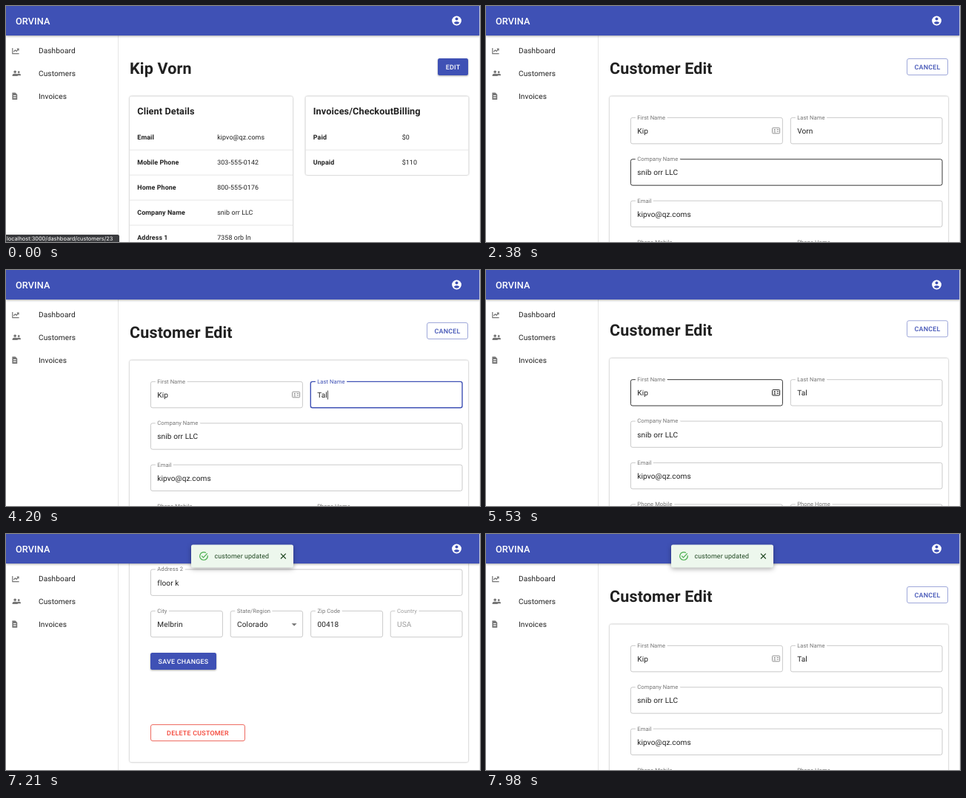
An HTML page for the animation above (8 s loop, 640 by 320 pixels).

```html
<!DOCTYPE html>
<html lang="en">
<head>
<meta charset="utf-8">
<title>Customer editor</title>
<style>
html, body { margin: 0; width: 100%; height: 100%; overflow: hidden; background: #fff; }
svg { display: block; width: 640px; height: 320px; }
text { font-family: Roboto, sans-serif; font-size: 10.1px; letter-spacing: .00938em; fill: #212121; white-space: pre; text-rendering: geometricPrecision; }
.title { font-size: 21.5px; font-weight: 700; letter-spacing: .00735em; }
.head { font-size: 12.7px; font-weight: 500; letter-spacing: .0075em; }
.bold { font-weight: 700; }
.cell { font-size: 8.9px; letter-spacing: .01071em; }
.btn { font-size: 8.9px; font-weight: 500; letter-spacing: .02857em; text-anchor: middle; }
.label { font-size: 7.6px; fill: #757575; stroke: #fff; stroke-width: 6px; paint-order: stroke; }
.off { fill: #9e9e9e; }
.status { font-family: Inter, sans-serif; font-size: 7.4px; letter-spacing: 0; }
.white { fill: #fff; }
.blue { fill: #3f51b5; }
.red { fill: #f44336; }
.green { fill: #1e4620; }
.box { fill: none; stroke: #c4c4c4; stroke-width: .9; }
.hover .box { stroke: #212121; }
.focus .box { stroke: #3f51b5; stroke-width: 1.4; }
.focus .label { fill: #3f51b5; }
.card { fill: #fff; filter: drop-shadow(0 .6px 1.1px rgba(0,0,0,.38)); }
.raised { fill: #3f51b5; filter: drop-shadow(0 1px 1.2px rgba(0,0,0,.35)); }
.raised.over { fill: #303f9f; }
.line { stroke: #e0e0e0; stroke-width: .8; }
.icon { fill: #757575; }
.stroke { fill: none; stroke-width: 1.2; }
#bar { filter: drop-shadow(0 1.6px 1.8px rgba(0,0,0,.35)); }
#toast { transform-origin: 319px 30px; }
#toast rect { fill: #edf7ed; filter: drop-shadow(0 2px 3px rgba(0,0,0,.32)); }
</style>
</head>
<body>
<svg id="stage" viewBox="0 0 640 320"></svg>
<script>
const text = (x, y, s, cls = '', id = '') => `<text x="${x}" y="${y}" class="${cls}" id="${id}">${s}</text>`;
const rect = (x, y, w, h, attrs = '') => `<rect x="${x}" y="${y}" width="${w}" height="${h}" ${attrs}/>`;
const line = (x, y, w) => `<path class="line" d="M${x} ${y}h${w}"/>`;
const group = (id, body) => `<g id="${id}">${body}</g>`;

const raised = (id, x, y, w, s) =>
  rect(x, y, w, 23, `rx="2.5" class="raised" id="${id}"`) + text(x + w / 2, y + 14.8, s, 'btn white');
const outlined = (x, y, w, s, cls, stroke) =>
  rect(x + .5, y + .5, w - 1, 22, `rx="2.5" fill="none" stroke="${stroke}"`) + text(x + w / 2, y + 14.8, s, 'btn ' + cls);

function card(x, h, title, rows) {
  return rect(x, 122.5, 220, h, 'rx="2.5" class="card"') + text(x + 10.3, 146.6, title, 'head bold') +
    rows.map(([name, value], i) => {
      const y = 181.2 + 34 * i;
      return text(x + 10.3, y, name, 'cell bold') + text(x + (x < 200 ? 118.2 : 130.2), y, value, 'cell') +
        (i < rows.length - 1 ? line(x, y + 14, 220) : '');
    }).join('');
}

// Form rows share one pitch; extra markup goes between outline and text.
function field(row, x, w, name, value, id = '', extra = '', off = '') {
  const y = 151.4 + 56.37 * row;
  return group(id, rect(x, y, w, 35.4, 'rx="2.5" class="box"') + text(x + 8.9, y + 2.4, name, 'label ' + off) +
    extra + text(x + 8.9, y + 21.5, value, off, id && id + 'Text'));
}

const person = (x, y, r) =>
  `<circle cx="${x}" cy="${y}" r="${r}"/><path d="M${x - 2 * r} ${y + r * 3.2}v${-r * .4}q0-${r * 1.4} ${r * 1.4}-${r * 1.4}h${r * 1.2}q${r * 1.4} 0 ${r * 1.4} ${r * 1.4}v${r * .4}z"/>`;

const idCard = '<g id="idCard"><rect x="386.6" y="165.2" width="10" height="7.6" rx="1" fill="none" stroke="currentColor"/>' +
  '<g fill="currentColor"><circle cx="389.8" cy="168" r="1.1"/><path d="M388 171.3q1.8-3 3.6 0z"/>' +
  '<path d="M392.6 167h2.6v1h-2.6zM392.6 169.4h2.6v1h-2.6z"/></g></g>';

const view = group('view',
  text(167, 92, 'Kip Vorn', 'title') + raised('edit', 583, 71, 41, 'EDIT') +
  card(167, 230, 'Client Details', [
    ['Email', 'kipvo@qz.coms'], ['Mobile Phone', '303-555-0142'], ['Home Phone', '800-555-0176'],
    ['Company Name', 'snib orr LLC'], ['Address 1', '7358 orb ln'], ['', '']]) +
  card(404.5, 106.5, 'Invoices/CheckoutBilling', [['Paid', '$0'], ['Unpaid', '$110']]));

const form = group('form',
  text(167, 92, 'Customer Edit', 'title') + outlined(568, 71, 56, 'CANCEL', 'blue', '#9fa8da') +
  rect(167, 122.5, 457, 572, 'rx="2.5" class="card"') +
  field(0, 195.4, 205, 'First Name', 'Kip', 'first', idCard) +
  field(0, 411.3, 204.7, 'Last Name', 'Vorn', 'last', rect(420, 163, 0, 13, 'id="selection" fill="#b3d7ff"')) +
  field(1, 195.4, 420.6, 'Company Name', 'snib orr LLC', 'company') +
  field(2, 195.4, 420.6, 'Email', 'kipvo@qz.coms') +
  field(3, 195.4, 205, 'Phone Mobile', '303-555-0142') +
  field(3, 411.3, 204.7, 'Phone Home', '800-555-0176') +
  field(4, 195.4, 420.6, 'Address 1', '7358 orb ln') +
  field(5, 195.4, 420.6, 'Address 2', 'floor k') +
  field(6, 195.4, 97, 'City', 'Melbrin') +
  field(6, 303.2, 97.4, 'State/Region', 'Colorado') + '<path class="icon" d="M385.6 506.6h7l-3.5 3.5z"/>' +
  field(6, 411.6, 97, 'Zip Code', '00418') +
  field(6, 519.2, 96.8, 'Country', 'USA', '', '', 'off') +
  raised('save', 195, 546.3, 89, 'SAVE CHANGES') +
  outlined(195, 643.3, 128, 'DELETE CUSTOMER', 'red', '#ee6a60') +
  rect(420, 163.5, .8, 12, 'id="caret" fill="#212121"'));

const side = rect(0, 40, 151.5, 280, 'fill="#fff"') + '<path class="line" d="M151.5 40v280"/>' +
  ['Dashboard', 'Customers', 'Invoices'].map((s, i) => text(44, 64.2 + 30.7 * i, s)).join('') +
  '<path class="stroke" stroke="#757575" d="M8.8 57v7.6h8.8M10.4 62l2-2.2 1.8 1.6 2.6-3M14.8 58.2h2.2v2.2"/>' +
  `<g class="icon">${person(12.2, 89.3, 1.8)}${person(17.2, 89.7, 1.4)}` +
  '<path d="M8.4 117.5h4.2l2.6 2.6v6.9h-6.8z"/></g><path class="stroke" stroke="#fff" d="M10 121.6h3.6M10 124.4h3.6"/>';

const bar = group('bar', rect(0, 0, 640, 40, 'class="blue"')) + text(13, 24.6, 'ORVINA', 'head white') +
  '<circle cx="608.5" cy="20" r="6.4" fill="#fff"/><g class="blue"><circle cx="608.5" cy="17.6" r="2"/>' +
  '<path d="M604.7 22.8q1.2-1.8 3.8-1.8t3.8 1.8q-1.4 2-3.8 2t-3.8-2z"/></g>' +
  rect(639.2, 0, .8, 320, 'fill="#e4e4e4"');

const toast = group('toast', rect(250, 14.5, 138, 31, 'rx="2.5"') +
  '<path class="stroke" stroke="#4caf50" d="M270 25.6a5.3 5.3 0 1 0 2.2 3.4M264.2 29.6l2.3 2.4 5.3-5.6"/>' +
  text(281.5, 33.2, 'customer updated', 'cell green') +
  '<path class="stroke" stroke="#1e4620" d="M371 26.7l6.8 6.8M377.8 26.7l-6.8 6.8"/>');

const status = group('status', rect(-3, 310, 156, 14, 'rx="2.5" fill="#3b3c3f"') +
  text(1, 317.7, 'localhost:3000/dashboard/customers/23', 'status white'));

document.getElementById('stage').innerHTML = view + form + side + bar + toast + status;

const $ = id => document.getElementById(id);
const set = (id, attrs) => Object.entries(attrs).forEach(([k, v]) => $(id).setAttribute(k, v));
const show = (id, on) => set(id, { visibility: on ? 'visible' : 'hidden' });
const ease = (t, from, to) => 1 - (1 - Math.min(1, Math.max(0, (t - from) / (to - from)))) ** 2;

const BOTTOM = 386.6, REST = 150;
const scroll = t => BOTTOM * ease(t, 5530, 5810) - (BOTTOM - REST) * ease(t, 7210, 7560) - REST * ease(t, 7700, 7980);
const lastName = t => t < 3850 ? 'Vorn' : t < 4060 ? 'T' : t < 4200 ? 'Ta' : 'Tal';

function draw(t) {
  const within = (a, b) => t >= a && t < b;
  const focused = within(2870, 5180);
  show('status', t < 140);
  set('status', { opacity: t < 70 ? 1 : .5 });
  show('view', t < 1820);
  show('form', t >= 1820);
  set('form', { transform: `translate(0 ${-scroll(t)})` });
  set('edit', { class: within(1640, 1820) ? 'raised over' : 'raised' });
  set('save', { class: within(6020, 7000) ? 'raised over' : 'raised' });

  const overFirst = within(5460, 5620);
  set('first', { class: overFirst ? 'hover' : '' });
  set('idCard', { color: overFirst ? '#212121' : '#909090' });
  set('company', { class: within(2380, 2590) ? 'hover' : '' });
  set('last', { class: focused ? 'focus' : within(2660, 2870) ? 'hover' : '' });

  $('lastText').textContent = lastName(t);
  const width = $('lastText').getComputedTextLength();
  set('selection', { width: within(3080, 3850) ? width : 0 });
  const typing = within(3850, 5180) && (t - 3850) % 1060 < 770;
  show('caret', typing);
  set('caret', { x: 420.3 + width });

  const grow = ease(t, 6700, 6930);
  show('toast', grow > 0);
  set('toast', { opacity: grow });
  $('toast').style.transform = `scale(${.75 + .25 * grow})`;
}

const start = performance.now();
function tick() {
  draw((performance.now() - start) % 8000);
  requestAnimationFrame(tick);
}
tick();
</script>
</body>
</html>
```
